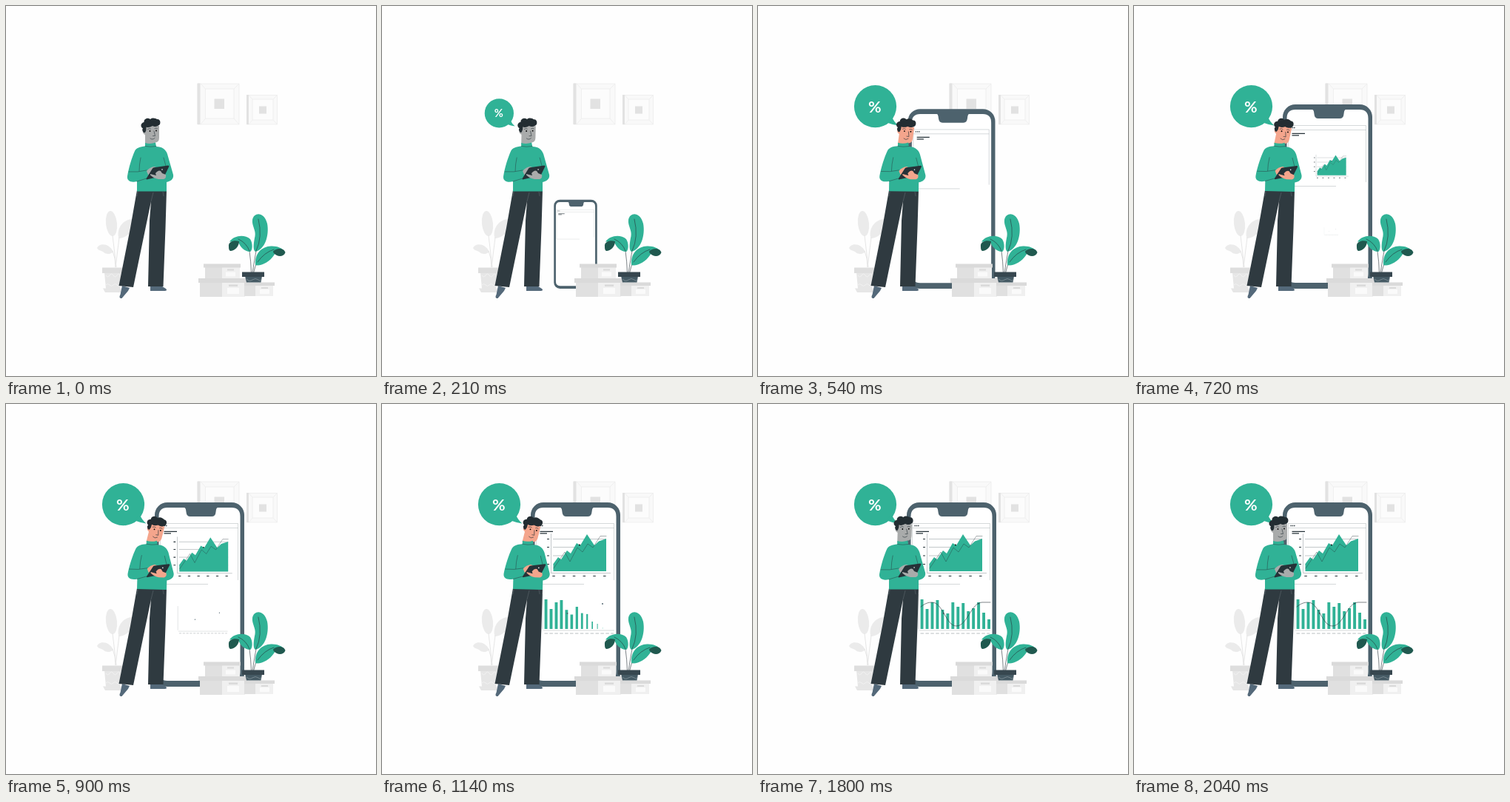
An HTML page for the animation above (2.37 s loop, 500 by 500 pixels).

```html
<!DOCTYPE html>
<html lang="en">
<head>
<meta charset="utf-8">
<title>Sales report</title>
<style>
html, body { margin: 0; width: 100%; height: 100%; overflow: hidden; background: #fefefe; }
svg { display: block; width: 100%; height: 100%; }
.line { fill: none; stroke: #263238; stroke-width: .6; stroke-linecap: round; }
.thin { fill: none; stroke: #9aa3a6; stroke-width: .6; }
.green { fill: #30b296; }
.dark { fill: #2f3a40; }
.skin { fill: var(--skin); }
</style>
</head>
<body>
<svg viewBox="0 0 500 500">
  <!-- wall pictures -->
  <g stroke="#ebebeb" stroke-width=".7">
    <path fill="#f9f9f9" d="M259 105H315V160H259Z"/>
    <path fill="#fcfcfc" d="M269.500 112H308V152H269.500Z"/>
    <path fill="none" d="M263 105l6.500 7M315 105l-7 7M263 160l6.500-8M315 160l-7-8"/>
    <path fill="#f9f9f9" d="M325.500 120.500H366.500V160H325.500Z"/>
    <path fill="#fcfcfc" d="M333 126H361V154H333Z"/>
    <path fill="none" d="M328 120.500l5 5.500M366.500 120.500l-5.500 5.500M328 160l5-6M366.500 160l-5.500-6"/>
  </g>
  <path fill="#e2e2e2" d="M258.500 104.500h4v55.500h-4zM325 120h3v40h-3zM281.500 125.500H295V139H281.500ZM342 135.500h10v10h-10z"/>

  <!-- pale plant -->
  <g fill="#ebebeb">
    <ellipse cx="142.500" cy="294" rx="7.500" ry="17" transform="rotate(-6 142.500 294)"/>
    <path d="M152 312C150 300 158 289 170 288L172 300C168 308 160 314 152 314Z"/>
    <path d="M123 327C126 320 139 320 145 332C140 337 134 335 131 332C128 330 125 331 123 327Z"/>
    <path fill="none" stroke="#e6e6e6" d="M144 310L149 353M153 313L148 353M144 331Q148 340 148 353"/>
    <path fill="#e6e6e6" d="M133 360H156L154 382H135ZM131 381.500H158L156 387H134Z"/>
    <path fill="#dedede" d="M130 353.500H158V361H130Z"/>
    <path fill="none" stroke="#f2f2f2" d="M135 364q2.500 4 5 0t5 0 5 0 4 0M135 377q2.500-3 5 0t5 0 5 0 4 0"/>
  </g>

  <g id="phone">
    <rect x="201" y="133" width="121" height="249" rx="17" fill="#4d626d"/>
    <path fill="#fff" d="M218 140H241Q243 140 243.500 146Q244 152 249 152H278Q283 152 283.500 146Q284 140 286 140H305Q316.500 140 316.500 152V362Q316.500 374 305 374H218Q206.500 374 206.500 362V152Q206.500 140 218 140Z"/>
    <path class="thin" stroke-opacity=".7" d="M208.500 243V161.500H313.500V238M208.500 167.500H313.500M208.500 243.500H273"/>
    <path fill="none" stroke="#263238" stroke-width="1.300" d="M211.500 164.500h1.400m.9 0h1.400m.9 0h1.400M213.500 172.300H231M213.500 174.800H223"/>
  </g>

  <g id="area">
    <path class="thin" d="M228.500 175V228.500H309M231 182.500H303M231 193.500H303M231 205H303M231 216.500H303"/>
    <path class="green" d="M231.500 226V216L238 207L242 210L250 198L255 202L263 188L268 191L277 176L287 191L293 185.500L303 182V226Z"/>
    <path class="line" stroke-opacity=".65" d="M232 222L247 200L254 213L264 194L271 200L278 189L285 194L295 178.500H303"/>
    <path fill="none" stroke="#263238" stroke-width="1.200" d="M223 182.500h3M223 193.500h3M223 205h3M223 216.500h3"/>
    <path fill="none" stroke="#263238" stroke-width="1.200" stroke-dasharray="3.500 10.250" d="M230.300 232.500H303"/>
    <circle cx="267" cy="190.500" r=".9"/>
  </g>

  <g id="bars"></g>
  <g id="axis">
    <path class="thin" stroke-opacity=".7" d="M217 257V304M218 306H314"/>
    <path fill="none" stroke="#b8bec0" stroke-dasharray="4.500 2.400" d="M219.500 310H313"/>
    <circle cx="250.500" cy="283" r=".9" fill="#455a64"/>
    <circle cx="298" cy="270" r=".9" fill="#455a64"/>
  </g>
  <path id="curve" class="line" d="M220 274C226 269 231 268 235 268C250 268 254 300 268 300C283 300 288 268 303 268H314"/>

  <!-- boxes -->
  <path fill="#f0f0f0" d="M292 353H316V368H292ZM292 374H323V393H292ZM337 378H361V392H337Z"/>
  <path fill="#e0e0e0" d="M269 353H292V368H269ZM262 374H292V393H262ZM322 378H337V392H322Z"/>
  <path fill="#dadada" d="M267 348.500H317V353.500H267ZM260 368H325.500V374H260ZM322 373.500H363V378H322Z"/>
  <path fill="#fafafa" d="M297 359.500h13v6h-13zM299 381h16v8h-16zM343 383h13v6h-13z"/>
  <path fill="#dadada" d="M299 355.500h9v2h-9zM301 376.500h12v2.500h-12zM345 380h9v2h-9z"/>

  <!-- green plant -->
  <path class="line" d="M333 361Q336 342 338 331M331.500 361Q331 345 329 331M334.500 361Q336 352 340 345"/>
  <path class="green" d="M333 289C335 278 349 278 353 294C356 310 350 329 337 332C333 330 335 318 336.500 311C338 303 332 297 333 289Z"/>
  <path class="green" d="M302 318.500C308 310 322 308 330 315C334 321 333 331 330 332C322 332 316 325 314 319Z"/>
  <path class="green" d="M337 349C336 334 346 325 358 324.500C366 324 373 327 376 331C370 331 364 333 362 337C356 346 344 352 337 350Z"/>
  <path fill="#20594f" d="M301 325C300 318 309 316 315 318C315 325 309 331 303 331C301 330 301 327 301 325ZM361 331.500C366 326 376 327 377.500 333C376 338 370 339 366 337C363 335 361 334 361 331.500Z"/>
  <path class="line" d="M338 331Q347 312 341 288M329 331Q325 320 314 315M340 346Q349 333 362 329"/>
  <path fill="#455a64" d="M323 365H346L344.500 373.500H325Z"/>
  <path fill="#37474f" d="M319 359.500H349V366H319Z"/>
  <path fill="none" stroke="#8b9aa1" stroke-width=".7" d="M325 369q4 4 8 1t8 0 4-1"/>

  <g id="bubble">
    <circle class="green" cx="158.500" cy="135.700" r="28.600"/>
    <path class="green" d="M170 160L181 150Q184 157 189.500 161.500Q182 160.500 174 157.500Z"/>
    <text x="157.800" y="143.500" fill="#fff" font-family="Lato, sans-serif" font-weight="700" font-size="21.500" text-anchor="middle">%</text>
  </g>

  <!-- man -->
  <path fill="#54697a" d="M157 378L167 381L165 385L156.500 395C153 395 153 393 154.500 390ZM195 377H208L216 382C218 384 217 385 214 385H195Z"/>
  <path class="dark" d="M177 249H217L215.500 300L212.500 379H192L194 290L196 264L172 380L152.500 378L168 300Z"/>
  <path fill="none" stroke="#667177" stroke-width=".5" d="M196 264L199 252M178 251l-1 6M212 251l1 6"/>
  <g id="torso">
    <g id="head">
      <path class="skin" d="M187 162H207V178Q207 184 201.500 184.500L202 188H188V174Q184 172 185 168Z"/>
      <path fill="#232d32" d="M186 171Q183 167 185 165.500C181 163 182 158 186.500 157C186 153 191 150 195 153C198 150 203 152 204 153C209 152 210 160 206 161.500Q202 164 198 162Q193 165 189.500 163.500Q190 168 188 171Z"/>
      <path class="line" stroke-width=".8" d="M191.500 166.500q2-1.500 4-.5M201 165.500q1.500-1 3.500 0M200 169L201.500 175.500H198.500M195 179Q198 181.500 201 178.500"/>
      <circle cx="194.500" cy="169" r=".9"/>
      <circle cx="203" cy="168.500" r=".9"/>
    </g>
    <path class="green" d="M188 185Q195 187 202 184.500L203 190C211 190 216 194 218 200L226 228C227 234 222 237 217 238V250.500H177V237C170 239 163 237 164 230C166 218 170 205 174 196C176 192 181 190 188 189.500Z"/>
    <path class="line" stroke-opacity=".75" d="M188 189.500Q195 191 203 189.500M182 205Q180 214 180 223M166 224Q178 225 190 222M177 237L190 233M213 205L216 216"/>
    <path class="skin" d="M190 223Q194 218 200 217L206 219L199 225L192 228Z"/>
    <path fill="#263238" d="M198 219.500Q198.500 218.500 200 218.300L219 215.500Q221 215.500 220 217.500L214.500 229L190 234.500Q189 234 190 232.500Z"/>
    <path class="skin" d="M195 227L203 229L202 226Q206 221 209 223L211 226L216 228Q217 233 213 234H206Q200 233 195 228.500Z"/>
    <circle cx="211" cy="221" r=".8" fill="#fff"/>
  </g>
</svg>
<script>
const $ = id => document.getElementById(id);
const STEP = 30, END = 2040, LOOP = 2370, BASE = 304;
const tops = [264, 277, 268, 265, 278, 283, 268, 274, 269, 280, 276, 268, 282, 291];

const clamp = v => Math.min(1, Math.max(0, v));
const grow = (t, start, length) => 1 - (1 - clamp((t - start) / length)) ** 1.5;
const zoom = (el, x, y, s) =>
  el.setAttribute('transform', `translate(${x} ${y}) scale(${s}) translate(${-x} ${-y})`);
const turn = (el, angle, x, y) => el.setAttribute('transform', `rotate(${angle} ${x} ${y})`);

const bars = tops.map((top, i) => {
  const bar = document.createElementNS('http://www.w3.org/2000/svg', 'path');
  bar.setAttribute('class', 'green');
  bar.setAttribute('d', `M${219.6 + i * 6.96} ${top}h3.9V${BASE}h-3.9Z`);
  $('bars').append(bar);
  return bar;
});

function draw(t) {
  zoom($('phone'), 261.5, 382, grow(t, 0, 590));
  zoom($('bubble'), 158, 165, grow(t, 0, 390));
  zoom($('area'), 267, 232, grow(t, 540, 440));
  zoom($('axis'), 266.7, 309.6, grow(t, 660, 440));
  bars.forEach((bar, i) => zoom(bar, 221.5 + i * 6.96, BASE, grow(t, 800 + i * 30, 230)));
  $('curve').setAttribute('opacity', clamp((t - 1380) / 300));

  const sway = Math.sin(Math.PI * t / END) ** 2;
  turn($('torso'), 1.7 * sway, 197, 250);
  turn($('head'), 13 * sway, 195, 186);
  document.body.style.setProperty('--skin', t >= 450 && t < 1560 ? '#f4a58c' : '#a9abab');
}

const begin = performance.now();
function tick() {
  const t = (performance.now() - begin) % LOOP;
  draw(Math.min(END, Math.floor(t / STEP) * STEP));
  requestAnimationFrame(tick);
}
tick();
</script>
</body>
</html>
```
